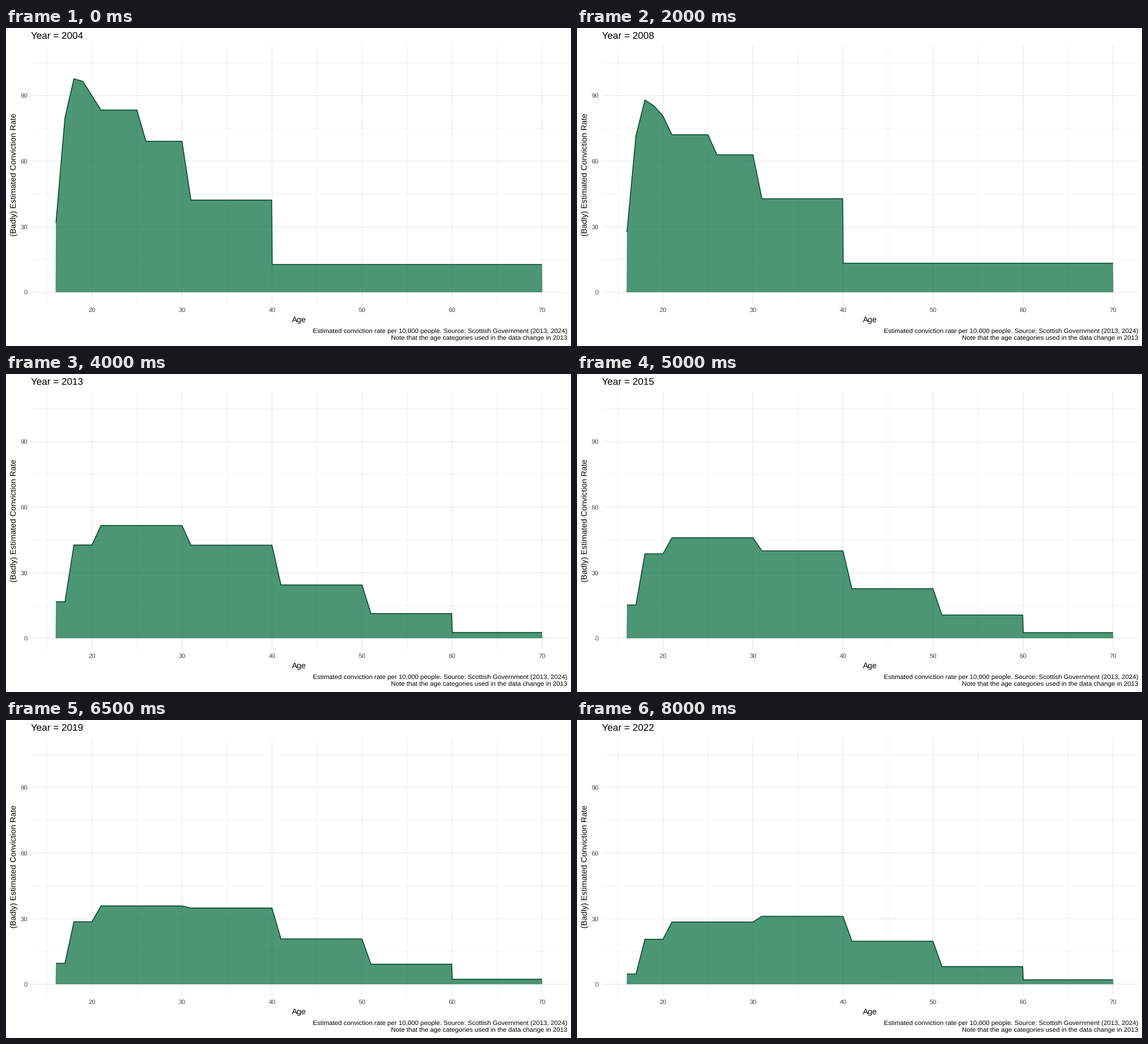
Write a matplotlib script that moves like this. It is 998x561 px and loops after 9500 ms.

```python
import math

import matplotlib.pyplot as plt
import numpy as np
from matplotlib.animation import FuncAnimation

WIDTH, HEIGHT, DPI = 998, 561, 100
LEFT, RIGHT, TOP, BOTTOM = 44.4, 991, 31, 487
BASE = 14.3  # base text size in pixels
FIRST_YEAR, LAST_YEAR, STEPS, PAUSE = 2004, 2022, 16, 2
NEW_BANDS_YEAR = 2013

plt.rcParams.update({"font.family": "Liberation Sans", "path.snap": False,
                     "text.hinting": "none"})

# Last age of each band, and the band rates in a few key years.
OLD_ENDS = [16, 17, 18, 19, 20, 25, 30, 40, 70]
OLD_KEYS = {
    2004: [31.7, 79.9, 97.7, 96.5, 89.9, 83.4, 69.1, 42.2, 12.7],
    2007: [33.4, 86.4, 103.8, 99.1, 92, 79.9, 67.4, 43.5, 13.3],
    2011: [14.7, 38.2, 52.4, 54.8, 55.8, 56.1, 53.6, 41, 13.1],
}
NEW_ENDS = [17, 20, 30, 40, 50, 60, 70]
NEW_KEYS = {
    2013: [16.7, 42.7, 51.6, 42.6, 24.4, 11.3, 2.65],
    2016: [14.5, 36.6, 43.2, 38.7, 21.8, 10.3, 2.55],
    2022: [4.7, 20.6, 28.5, 31.1, 19.7, 8.1, 2.05],
}
DIP = {2020: 0.56, 2021: 0.85}  # temporary fall below the trend


def px_x(age):
    return 151.8 + 15.9 * (age - 20)


def px_y(rate):
    return 466.2 - 3.855 * rate


def points(pixels):
    return pixels * 72 / DPI


def label(x, y, text, scale=1.0, color="black", **kw):
    return ax.text(x, y, text, fontsize=points(BASE * scale), color=color,
                   va="baseline", **kw)


def grid(xs, ys, width):
    style = dict(colors="#ebebeb", linewidths=points(width), zorder=1)
    ax.hlines([px_y(y) for y in ys], LEFT, RIGHT, **style)
    ax.vlines([px_x(x) for x in xs], TOP, BOTTOM, **style)


def old_rates(year):
    """Cubic trend through the key years, leaving the last one in a line."""
    years = np.array([*OLD_KEYS, 2012]) - FIRST_YEAR
    rows = np.array(list(OLD_KEYS.values()))
    next_row = rows[-1] + (rows[-1] - rows[-2]) / (years[2] - years[1])
    cubic = np.polyfit(years, np.vstack([rows, next_row]), 3)
    return (year - FIRST_YEAR) ** np.arange(3, -1, -1) @ cubic


def new_rates(year):
    """Straight trend between key years, with the temporary dip."""
    columns = zip(*NEW_KEYS.values())
    trend = np.array([np.interp(year, list(NEW_KEYS), c) for c in columns])
    return trend * DIP.get(year, 1)


def profile(year):
    """Pixel outline of the rate curve; the last band starts with a drop."""
    if year < NEW_BANDS_YEAR:
        ends, rates = OLD_ENDS, old_rates(year)
    else:
        ends, rates = NEW_ENDS, new_rates(year)
    starts = [16] + [end + 1 for end in ends[:-2]] + [ends[-2] + 0.03]
    stops = ends[:-2] + [ends[-2] - 0.03, ends[-1]]
    return [(px_x(age), px_y(rate))
            for start, stop, rate in zip(starts, stops, rates)
            for age in (start, stop)]


fig = plt.figure(figsize=(WIDTH / DPI, HEIGHT / DPI), dpi=DPI, facecolor="white")
ax = fig.add_axes([0, 0, 1, 1])
ax.set(xlim=(0, WIDTH), ylim=(HEIGHT, 0))
ax.axis("off")

grid(range(15, 70, 10), range(15, 110, 30), 0.7)
grid(range(20, 71, 10), range(0, 91, 30), 1.4)

for age in range(20, 71, 10):
    label(px_x(age), 501.2, str(age), 0.8, "#4d4d4d", ha="center")
for rate in range(0, 91, 30):
    label(38.4, px_y(rate) + 4.1, str(rate), 0.8, "#4d4d4d", ha="right")

label((LEFT + RIGHT) / 2, 518.8, "Age", ha="center")
label(17.8, 259, "(Badly) Estimated Conviction Rate", ha="center",
      rotation=90, rotation_mode="anchor")
label(RIGHT, 538.4, "Estimated conviction rate per 10,000 people. "
      "Source: Scottish Government (2013, 2024)", 0.8, ha="right")
label(RIGHT, 551, "Note that the age categories used in the data change in 2013",
      0.8, ha="right")
title = label(LEFT, 19.5, "", 1.2, ha="left")

area, = ax.fill([0], [0], color="#00693a", alpha=0.7, linewidth=0, zorder=2)
line, = ax.plot([], [], color="#004529", linewidth=points(1.5), zorder=3,
                solid_capstyle="butt", solid_joinstyle="miter")


def update(frame):
    time = FIRST_YEAR + (LAST_YEAR - FIRST_YEAR) * min(frame, STEPS) / STEPS
    # Whole years only; halfway between two years shows their mean.
    year = (math.floor(time + 0.5) + math.ceil(time - 0.5)) / 2
    curve = profile(year)
    area.set_xy([(px_x(15.96), px_y(0)), *curve, (px_x(70.04), px_y(0))])
    line.set_data(*zip(*curve))
    title.set_text(f"Year = {round(time)}")
    return area, line, title


anim = FuncAnimation(fig, update, frames=STEPS + 1 + PAUSE, interval=500,
                     init_func=lambda: update(0), repeat=True, repeat_delay=0)
plt.show()
```
